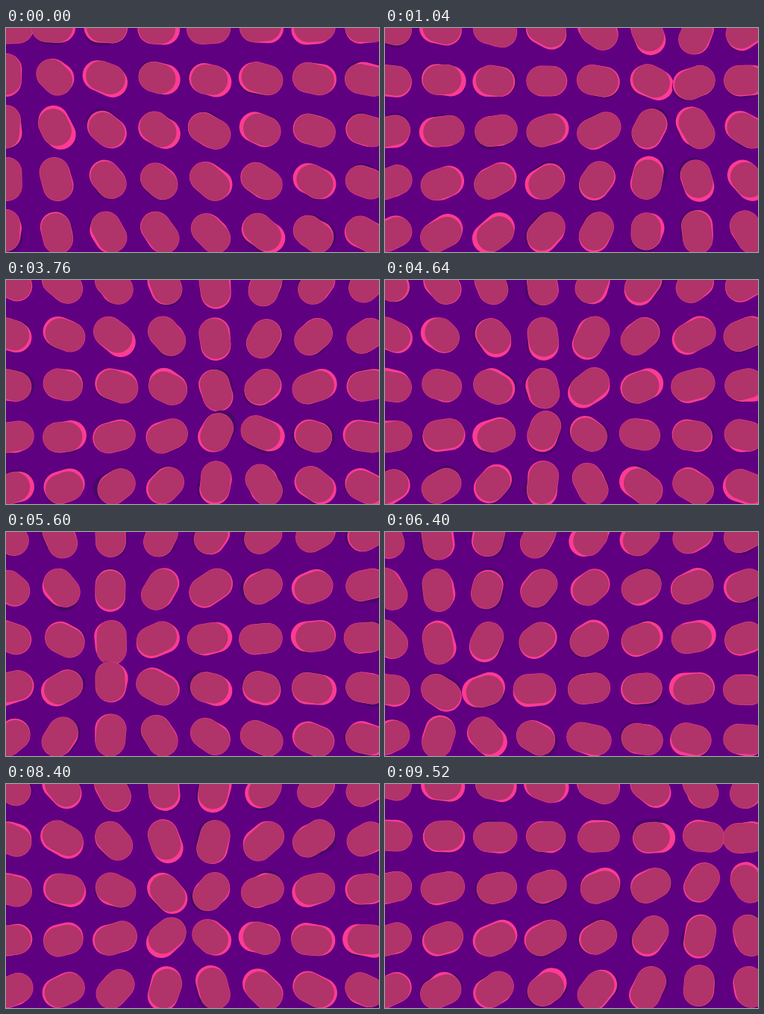
Write an HTML page with a canvas that moves like this. It is 500 px wide and 300 px high and loops after 9600 ms.

```html
<!DOCTYPE html>
<html lang="en">
<head>
<meta charset="utf-8">
<title>Jittering pills</title>
<style>
  html, body { margin: 0; width: 100%; height: 100%; overflow: hidden; background: #5f0080; }
  canvas { display: block; }
</style>
</head>
<body>
<canvas id="stage" width="500" height="300"></canvas>
<script>
const ctx = document.getElementById('stage').getContext('2d');
const LOOP = 9600, STEP = 80, GAP = 70, REACH = 15, WEIGHT = 40;
const BACK = '#5f0080', SHADE = '#470868', PINK = '#ff3b93', ROSE = '#b0336a';

// Pointer track: time, x, y. It rests at the corner before it enters.
const ENTRY = 400;
const track = [
  [400, 396, 40],
  [1040, 385, 83],
  [2400, 362, 104],
  [3760, 294, 182],
  [5600, 142, 175],
  [7280, 36, 282],
  [9520, 455, 73]
];

function focusAt(time) {
  if (time < ENTRY) return [0, 0];
  for (let i = 1; i < track.length; i++) {
    const [t0, x0, y0] = track[i - 1];
    const [t1, x1, y1] = track[i];
    if (time <= t1) {
      const k = (time - t0) / (t1 - t0);
      return [x0 + (x1 - x0) * k, y0 + (y1 - y0) * k];
    }
  }
  return track[track.length - 1].slice(1);
}

function randomFrom(seed) {
  let state = seed | 0;
  return () => {
    state = (state + 0x6d2b79f5) | 0;
    let n = Math.imul(state ^ (state >>> 15), 1 | state);
    n = (n + Math.imul(n ^ (n >>> 7), 61 | n)) ^ n;
    return ((n ^ (n >>> 14)) >>> 0) / 4294967296;
  };
}

function strokeLine(ends, color, width) {
  ctx.strokeStyle = color;
  ctx.lineWidth = width;
  ctx.beginPath();
  ctx.moveTo(ends[0], ends[1]);
  ctx.lineTo(ends[2], ends[3]);
  ctx.stroke();
}

function drawPill(x, y, focus, random) {
  const spread = amount => (random() * 2 - 1) * amount;
  const angle = Math.atan2(focus[1] - y, focus[0] - x);
  const cos = Math.cos(angle), sin = Math.sin(angle);

  // Each layer slides along the aim by its own amount and tilts only a little.
  const layer = (along, across) => {
    const from = spread(along), to = REACH + spread(along);
    const side = spread(across), tilt = spread(across / 2);
    const place = (d, s) => [x + d * cos - s * sin, y + d * sin + s * cos];
    return [...place(from, side - tilt), ...place(to, side + tilt)];
  };

  strokeLine(layer(3, 3), SHADE, WEIGHT);
  strokeLine(layer(4, 2), PINK, WEIGHT + 0.5);
  const face = layer(3, 1.5);
  strokeLine(face, PINK, WEIGHT + 0.5);
  strokeLine(face, ROSE, WEIGHT - 0.5);
}

function draw(step) {
  const focus = focusAt(step * STEP);
  const random = randomFrom(step * 7919 + 17);
  ctx.fillStyle = BACK;
  ctx.fillRect(0, 0, 500, 300);
  ctx.lineCap = 'round';
  for (let x = 0; x <= 500; x += GAP) {
    for (let y = 0; y <= 300; y += GAP) drawPill(x, y, focus, random);
  }
}

const start = performance.now();
let shown = -1;
function tick() {
  const elapsed = Math.max(0, performance.now() - start) % LOOP;
  const step = Math.floor(elapsed / STEP);
  if (step !== shown) draw(shown = step);
  requestAnimationFrame(tick);
}
tick();
</script>
</body>
</html>
```
